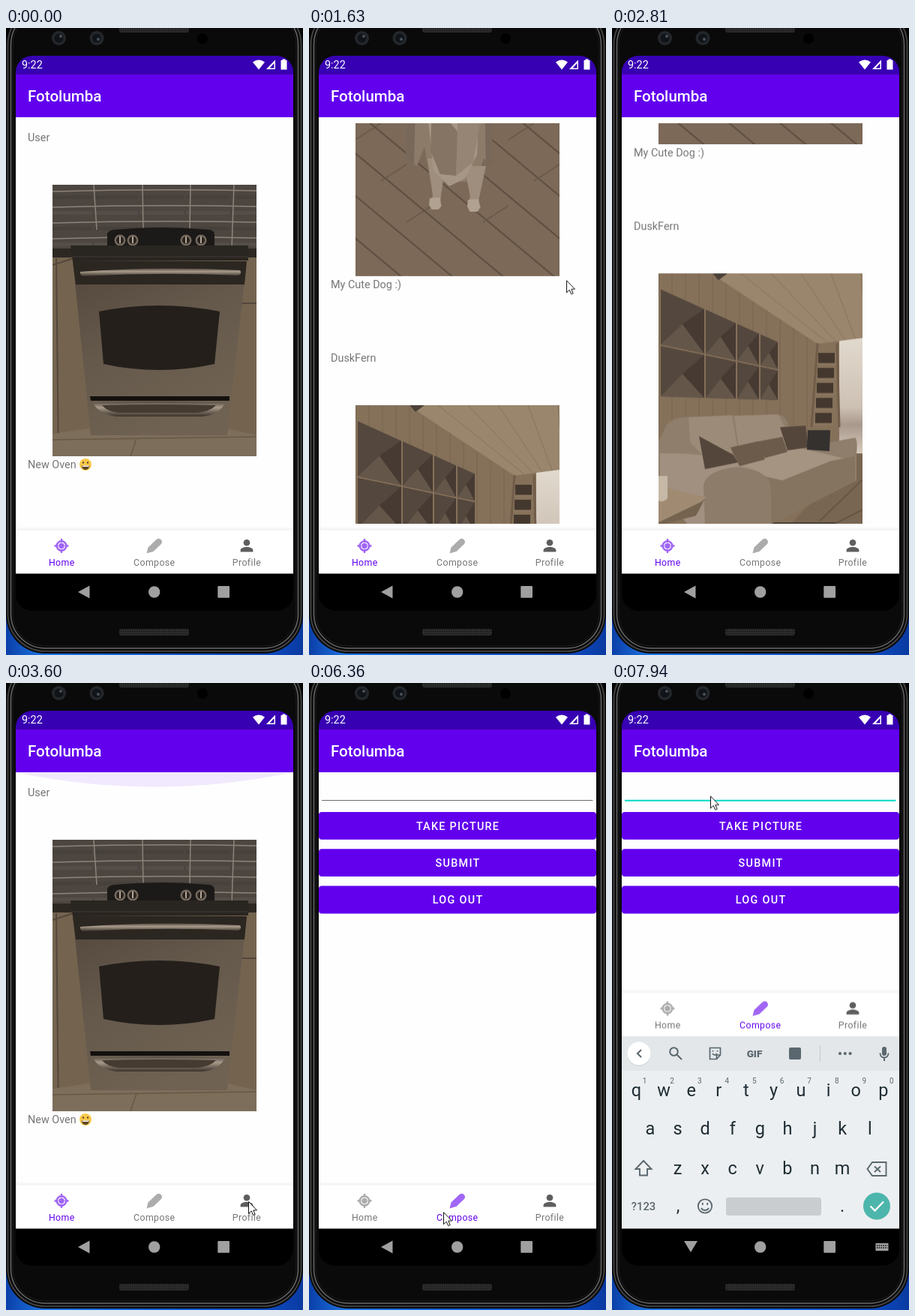
Recreate the animation shown at these times as an HTML page. Size 396 px wide and 836 px high, loop 8000 ms.

```html
<!DOCTYPE html>
<html lang="en">
<head>
<meta charset="utf-8">
<title>Photo feed</title>
<style>
html, body { margin: 0; width: 100%; height: 100%; overflow: hidden; background: #000; }
svg { display: block; }
text { font-family: Roboto, "Noto Sans", sans-serif; }
.title { font-size: 20.6px; font-weight: 500; fill: #fff; }
.body { font-size: 14.4px; fill: #757575; }
.mid { text-anchor: middle; }
.label { font-size: 12.3px; letter-spacing: .4px; fill: currentColor; }
.btn { font-size: 14.4px; font-weight: 500; letter-spacing: 1.28px; fill: #fff; }
.key { font-size: 23.5px; fill: #1f2d34; }
.hint { font-size: 10px; fill: #5a676e; }
.line { fill: none; stroke: #5a676e; stroke-width: 2; }
</style>
</head>
<body>
<svg id="stage" width="396" height="836" viewBox="0 0 396 836">
<defs>
  <clipPath id="screen"><rect x="13" y="37" width="370" height="740" rx="22"/></clipPath>
  <clipPath id="feedBox"><rect x="13" y="127" width="370" height="534"/></clipPath>
  <clipPath id="navBox"><rect x="13" y="670" width="370" height="58"/></clipPath>
  <clipPath id="keysBox"><rect x="13" y="400" width="370" height="328"/></clipPath>
  <linearGradient id="wall" x2="1"><stop stop-color="#0b3fa8"/><stop offset=".12" stop-color="#1c72e0"/><stop offset=".9" stop-color="#0c48bd"/><stop offset="1" stop-color="#0a3aa0"/></linearGradient>
  <linearGradient id="steel" x2=".5" y2="1"><stop stop-color="#53473d"/><stop offset=".5" stop-color="#65594c"/><stop offset="1" stop-color="#6f6252"/></linearGradient>
  <linearGradient id="silver" x2="0" y2="1"><stop stop-color="#51483f"/><stop offset=".4" stop-color="#a89b8b"/><stop offset="1" stop-color="#3a322b"/></linearGradient>
  <linearGradient id="wood" x2="1" y2="1"><stop stop-color="#8f7b65"/><stop offset="1" stop-color="#7b6750"/></linearGradient>
  <linearGradient id="sky" x2="0" y2="1"><stop stop-color="#e2d9ce"/><stop offset=".6" stop-color="#cdc1b4"/><stop offset=".75" stop-color="#a9998c"/><stop offset="1" stop-color="#d6cabd"/></linearGradient>
  <linearGradient id="rim" x2="0" y2="1"><stop stop-color="#000" stop-opacity="0"/><stop offset="1" stop-color="#000" stop-opacity=".06"/></linearGradient>
  <pattern id="check" width="16" height="18" patternUnits="userSpaceOnUse" patternTransform="matrix(1 -.2 0 1 151 121)">
    <path fill="#b7b4b2" d="M0 0H16V18H0Z"/><path fill="#17171a" d="M0 0H8V9H0ZM8 9H16V18H8Z"/>
  </pattern>
  <pattern id="mesh" width="3" height="3" patternUnits="userSpaceOnUse">
    <path fill="#2d2d2d" d="M0 0H3V3H0Z"/><path fill="#171717" d="M0 0H1.5V1.5H0Z"/>
  </pattern>
</defs>

<!-- phone body -->
<path fill="url(#wall)" d="M0 740H396V836H0Z"/>
<rect x="0" y="-30" width="396" height="864" rx="52" fill="#0b0b0b"/>
<rect x="2.5" y="-28" width="391" height="859" rx="50" fill="none" stroke="#4b4b4b" stroke-width="1.5"/>
<rect x="6.5" y="-24" width="383" height="851" rx="46" fill="#070707" stroke="#686868" stroke-width="1.5"/>
<rect x="9" y="-21" width="378" height="845" rx="43" fill="#0a0a0a" stroke="#1f1f1f"/>
<rect x="151" y="-4" width="93" height="10" rx="3" fill="url(#mesh)"/>
<rect x="151" y="801" width="93" height="9" rx="3" fill="url(#mesh)"/>
<g fill="#24272b"><circle cx="70.500" cy="13.500" r="9.500"/><circle cx="121" cy="13.500" r="9.500"/></g>
<g fill="#101419"><circle cx="70.500" cy="13.500" r="6"/><circle cx="121" cy="13.500" r="6"/></g>
<g fill="#47525c"><circle cx="73" cy="11" r="2"/><circle cx="123" cy="15" r="2"/></g>
<circle cx="262" cy="14" r="7" fill="#000"/>

<g clip-path="url(#screen)">
  <path fill="#fefefe" d="M13 119H383V728H13Z"/>

  <g id="home">
    <g clip-path="url(#feedBox)"><g id="feed"></g></g>
    <path id="glow" fill="#6200ee" d="M13 119H383Q198 158 13 119Z"/>
  </g>

  <g id="compose">
    <path fill="#fefefe" d="M13 119H383V670H13Z"/>
    <path id="rule" d="M17 156.500H378.500" stroke="#6d6d6d"/>
    <path id="ruleOn" d="M17 156.700H378.500" stroke="#03dac5" stroke-width="2"/>
    <path id="caret" d="M17.500 130V154" stroke="#03dac5" stroke-width="2"/>
    <g id="buttons"></g>
  </g>

  <g id="nav">
    <path fill="url(#rim)" d="M13 665H383V670H13Z"/>
    <path fill="#fff" d="M13 669.500H383V728H13Z"/>
    <g clip-path="url(#navBox)"><circle id="ripple" r="68" fill="#6200ee"/></g>
    <g id="tabHome">
      <g fill="none" stroke="currentColor" opacity=".6"><circle cx="74" cy="690.500" r="6.300" stroke-width="2.600"/><path stroke-width="2.400" d="M74 681V686M74 695V700M64.500 690.500H69.500M78.500 690.500H83.500"/><circle cx="74" cy="690.500" r="3.700" fill="currentColor" stroke="none"/></g>
      <text class="label mid" x="74.300" y="717">Home</text>
    </g>
    <g id="tabCompose">
      <path fill="currentColor" opacity=".6" d="M187.500 700.500L189.500 692.500 200 682.500Q203 679.500 206 681.500 209.500 684.500 207 688L196.500 698Z"/>
      <text class="label mid" x="197.800" y="717">Compose</text>
    </g>
    <g color="#757575">
      <g fill="#5e5e5e"><circle cx="321" cy="686.300" r="4.300"/><path d="M312.600 698.500V696.500C312.600 690.500 329.400 690.500 329.400 696.500V698.500Z"/></g>
      <text class="label mid" x="321" y="717">Profile</text>
    </g>
  </g>

  <g clip-path="url(#keysBox)"><g id="keys">
    <path fill="#eceff1" d="M13 471H383V728H13Z"/><path fill="#e3e7ea" d="M13 471H383V517H13Z"/>
    <circle cx="36" cy="495" r="15.500" fill="#c9ced2"/><circle cx="36" cy="494" r="15.500" fill="#fff"/>
    <g class="line">
      <path d="M39 489L34 494 39 499"/>
      <circle cx="82.500" cy="491.500" r="5.300"/><path d="M86.500 495.500L93 502"/>
      <path stroke-width="1.700" d="M132 486.500H144.500V496L139.500 501.500H130.500V486.500H133M139.500 501V496H144M134 494Q137 498 140 494M134.500 490V491.500M140.500 490V491.500"/>
      <path stroke-width="1" stroke="#c3c9cd" d="M277.500 483V505"/>
      <path d="M357.500 493.500C357.500 501.500 368.500 501.500 368.500 493.500M363 499.500V504"/>
      <path stroke-width="1.900" d="M42 637L31.500 648H37V656.500H47V648H52.500Z"/>
      <path stroke-width="1.900" d="M347 639H365.500V657H347L340.500 648ZM350 644.500L358 652M358 644.500L350 652"/>
      <circle cx="124" cy="697.500" r="9.200" stroke-width="1.800"/><path d="M119 700C121 704 127 704 129 700M120.800 693V696M127.200 693V696" stroke-width="1.800"/>
    </g>
    <g fill="#5a676e">
      <text class="mid" x="190" y="498.800" font-size="13.500" font-weight="900">GIF</text>
      <rect x="236" y="486" width="16" height="16" rx="2"/>
      <circle cx="304" cy="494" r="2.100"/><circle cx="310.800" cy="494" r="2.100"/><circle cx="317.600" cy="494" r="2.100"/>
      <rect x="360" y="485" width="6" height="12" rx="3"/>
      <text class="mid" x="42" y="703" font-size="14.800" font-weight="500">?123</text>
    </g>
    <rect x="152" y="686" width="127" height="24" rx="3" fill="#c9cdd0"/>
    <circle cx="353" cy="697.500" r="18" fill="#4db6ac"/>
    <path d="M344.500 697.500L350.500 703.500 362 691.500" fill="none" stroke="#fff" stroke-width="2.300"/>
  </g></g>

  <path fill="#3700b3" d="M13 37H383V61.500H13Z"/>
  <path fill="#6200ee" d="M13 61.500H383V119H13Z"/>
  <text x="21" y="54.300" font-size="14.400" fill="#fff">9:22</text>
  <g fill="#fff">
    <path d="M329 45.500Q337 39.500 345 45.500L337 55.500Z"/>
    <path d="M359 42.500V55H347Z"/><path fill="#3700b3" d="M357.500 47V53.500H351.500Z"/>
    <path d="M366.500 43H368.500V41.500H372.500V43H374.500V55.500H366.500Z"/>
  </g>
  <text class="title" x="29" y="98">Fotolumba</text>

  <path fill="#000" d="M13 727.500H383V777H13Z"/>
  <g fill="#a0a0a0">
    <path id="back" d="M96 752L111.500 743.500V760.500Z"/>
    <g id="hide"><path d="M96 744H114L105 759Z"/><path d="M351.500 747H368.500V757H351.500Z"/><path d="M353 750H367.500M353 753H367.500" stroke="#000" stroke-width="1.300" stroke-dasharray="1.500 1.300"/></g>
    <circle cx="197.700" cy="752" r="7.700"/><rect x="282.300" y="744" width="15.700" height="15.700" rx="1"/>
  </g>
</g>

<g id="mouse"><path fill="#fff" stroke="#111" d="M.5.5V16.500L4.200 13 6.700 18.500 9.200 17.500 6.800 12H11.500Z"/></g>
</svg>

<script>
const LOOP = 8000, POST = 534;
const $ = id => document.getElementById(id);
const add = (id, markup) => $(id).insertAdjacentHTML('beforeend', markup);
const range = (n, fn) => Array.from({ length: n }, (_, i) => fn(i)).join('');
const path = (fill, d) => `<path fill="${fill}" d="${d}"/>`;
const lines = (stroke, d, width = 1) => `<path fill="none" stroke="${stroke}" stroke-width="${width}" d="${d}"/>`;

const shelves = (x, y, w, n, gap, slope) => range(n, i =>
  path('#44382e', `M${x + i * slope} ${y + i * gap - 15}h${w}v14h${-w}z`) +
  lines('#8a7660', `M${x + i * slope - 3} ${y + i * gap}h${w + 6}`, 3));

function oven() {
  const tiles = range(4, r => lines('#8c8379', `M0 ${9 + r * 21}Q136 ${5 + r * 21} 272 ${8 + r * 21}`, 1.5) +
    range(5, c => path(r % 2 ? '#554e48' : '#47413c', `M${c * 61 - 5} ${14 + r * 21}h58v5h-58z`)));
  const knobs = [90, 107, 178, 198].map(x => `<circle cx="${x}" cy="74" r="7.500" fill="#75695e"/><circle cx="${x}" cy="74" r="5" fill="#292420"/>` +
    lines('#b5a797', `M${x} 69v9`, 2)).join('');
  return path('#4d4640', 'M0 0H272V100H0Z') + tiles + lines('#8c8379', 'M55 0L59 60M120 0L121 60M184 0L183 60M242 0L239 85', 1.5) +
    path('#74644f', 'M0 95H272V362H0Z') + lines('#54473a', 'M0 107L28 98M5 98L8 362M252 158H272', 2) +
    path('#2e2823', 'M0 85H272V97H0Z') + path('#7d6e5b', 'M0 332L48 325H233L272 334V362H0Z') +
    lines('#665845', 'M0 340L272 336M112 338L104 362', 1.5) +
    path('#1c1a18', 'M73 84V65Q75 61 82 60 145 54 210 60 216 62 216 66V84Z') + knobs +
    path('url(#steel)', 'M27 102H259L233 334H51Z') + path('#2c2621', 'M27 102H259L256 133H31Z') +
    path('#292521', 'M24 81H261V101L27 102Z') + lines('#403a34', 'M24 96H261') +
    path('url(#silver)', 'M37 116Q145 108 250 114Q253 118 248 121 145 116 41 122 36 120 37 116Z') +
    path('#241f1b', 'M62 169Q142 153 223 169L216 239Q142 255 68 239Z') +
    path('#14110f', 'M50 282H236V288H51Z') +
    path('url(#silver)', 'M54 291Q140 287 230 291 222 307 200 309H85Q62 306 54 291Z') +
    path('#463b31', 'M66 294Q142 292 218 294 211 302 193 304H90Q73 303 66 294Z');
}

function dog() {
  return path('#7c6958', 'M0 0H272V362H0Z') +
    range(9, i => lines('#5f4f42', `M${i * 68 - 310} 110L${i * 68 + 20} 385`, 2) +
      lines('#6b5a4b', `M${i * 34} ${180 + i % 3 * 55}l34 -22`, 1.5)) +
    path('#8d7b6a', 'M68 60H183L180 212 171 205 162 236 100 236 92 190 82 215 67 206Z') +
    path('#9f8e7d', 'M96 205H121L113 262 115 268 111 273H101L98 266 103 255Z') +
    path('#9f8e7d', 'M145 215H174L164 262 167 270 163 276H152L149 268 153 256Z') +
    path('#b1a190', 'M99 258L113 257 114 269 110 273H102L98 267ZM150 260L164 259 166 270 162 276H153L149 269Z') +
    path('#a69686', 'M87 60H168L162 200 146 232 125 242 104 222Z') +
    path('#857363', 'M102 130L137 170 134 228 113 226 100 195Z') +
    path('#968574', 'M137 130H171L157 210 134 228Z') + path('#78685a', 'M68 60H82L78 213 67 206ZM171 60H185L182 210 174 218Z');
}

function sofa() {
  const xs = [3, 63, 105, 136, 161];
  const edge = (x, row) => [20 + x * .45, 96 + x * .21, 166 + x * .03][row];
  const panels = range(8, i => {
    const c = i % 4, r = i >> 2, a = xs[c], b = xs[c + 1] - 2;
    const [p, q, s, t] = [edge(a, r), edge(b, r), edge(b, r + 1) - 2, edge(a, r + 1) - 2];
    const mx = (a + b) / 2, my = (p + q + s + t) / 4;
    return path('#54473d', `M${a} ${p}L${b} ${q}V${s}L${a} ${t}Z`) + path('#65564a', `M${a} ${t}L${mx} ${my}L${b} ${s}Z`) +
      path('#463a32', `M${b} ${q}V${s}L${mx} ${my}Z`);
  });
  return path('#85715a', 'M0 0H272V362H0Z') + range(12, i => lines('#78654f', `M${i * 18} 0V215`)) +
    path('#9a866c', 'M70 0H272V86L212 94Z') + range(5, i => lines('#88745d', `M${110 + i * 40} 0L${225 + i * 13} 92`)) +
    path('#4b4138', 'M72 0H92L80 9Z') + panels +
    path('url(#sky)', 'M241 90L272 86V240H241Z') + shelves(213, 121, 22, 5, 20, -1) +
    lines('#715d49', 'M212 93L204 205M238 93L241 205', 3) +
    path('#796652', 'M150 362L264 240H272V362Z') + lines('#5f5041', 'M215 330L272 275M180 362L272 315', 1.5) +
    path('#43382f', 'M60 362L140 332H238L180 362Z') +
    path('#8f7e6c', 'M9 205Q15 192 40 191L160 188Q172 190 175 210L230 225 262 219Q266 222 264 240V276L150 334H60L0 310V225Z') +
    path('#9c8b79', 'M40 192L98 189 106 238 60 244 42 225ZM101 190L160 188 172 212 170 230 108 238Z') +
    path('#a59481', 'M60 250L172 229 262 250 170 283Z') + path('#85745f', 'M80 256L165 276 230 250 262 244V276L150 334V290Z') +
    path('#a19080', 'M2 240Q70 238 120 258 150 268 149 288V336H40L2 290Z') + path('#8d7c6a', 'M60 282Q64 262 105 258 148 262 149 286V336H62Z') +
    path('#55463b', 'M54 217L100 242 106 252 62 261ZM162 205L196 203 200 232 172 236Z') +
    path('#6c5a4b', 'M96 232L132 224 142 248 108 257ZM128 225L165 218 172 238 142 246Z') + path('#34312f', 'M199 209L229 209 228 237 198 235Z') +
    path('#75634f', 'M0 288L62 300 50 323 0 336Z') + path('#a08b72', 'M0 284L64 298 58 304 0 332Z') +
    path('#c5b8a6', 'M0 270H12V300Q6 306 0 303Z');
}

function room() {
  return path('url(#wood)', 'M0 0H272V362H0Z') + path('#97846c', 'M0 0H215L112 72 0 58Z') +
    range(5, i => lines('#86735c', `M${i * 45} 0L${45 + i * 17} 64`)) + range(9, i => lines('#776349', `M${122 + i * 19} ${64 - i * 7}V195`)) +
    path('url(#sky)', 'M0 62L63 68V205L0 212Z') + lines('#6a5848', 'M0 61L64 68V215', 2) +
    path('#9d8b77', 'M0 212L130 205 272 300V362H0Z') + lines('#816e5b', 'M0 225L130 213M20 210L8 250M45 208L40 245M115 230L225 331', 1.5) +
    shelves(75, 100, 28, 6, 22, 1) + lines('#5d4b3c', 'M65 69L76 221M99 73L117 219', 4) +
    path('#5c4f43', 'M0 251L108 239 208 331 160 362H0Z') + range(4, i => lines('#4c4036', `M0 ${268 + i * 25}L${118 + i * 24} ${249 + i * 24}`, 4)) +
    path('#8c765e', 'M128 199L150 190 272 208V262L232 271 128 231Z') + path('#a48d72', 'M128 199L150 190 272 202V212L225 218Z') +
    lines('#66533f', 'M180 208V249M225 218V270M135 234L139 251M223 270L229 297M262 264L257 291', 2) +
    path('#29241f', 'M170 198L200 193 236 198 205 202ZM180 185H194V197H180Z') +
    path('#28211c', 'M148 117L245 96 242 194 149 183Z') + path('url(#check)', 'M151 120L242 100 239 190 151 180Z') +
    path('#00a000', 'M149 166L160 165 161 183 149 181Z') +
    path('#b9ab9a', 'M57 207L61 203 66 208 70 205 71 215 75 222 76 238H58L57 224 60 217Z');
}

const smiley = `<circle cx="106" cy="582" r="8" fill="#fbc94b"/>` + path('#5b4524', 'M100.500 583.500H111.500Q110 589 106 589 102 589 100.500 583.500Z') +
  path('#fff', 'M101.500 583.500H110.500V585H102Z') + `<g fill="#5b4524"><circle cx="103" cy="579.500" r="1.200"/><circle cx="109" cy="579.500" r="1.200"/></g>`;

const posts = [
  ['User', 'New Oven', oven], ['User', 'My Cute Dog :)', dog],
  ['DuskFern', 'Post', sofa], ['DuskFern', 'Post', room]
];
posts.forEach(([author, note, photo], i) => add('feed', `<g transform="translate(0 ${i * POST})">
  <text class="body" x="29" y="151">${author}</text>
  <svg x="62" y="209" width="272" height="362">${photo()}</svg>
  <text class="body" x="29" y="587">${note}</text>${i ? '' : smiley}</g>`));

['TAKE PICTURE', 'SUBMIT', 'LOG OUT'].forEach((name, i) => {
  const y = 172 + i * 49.3;
  add('buttons', `<rect x="13" y="${y}" width="370" height="36.800" rx="4" fill="#6200ee"/><text class="btn mid" x="198.600" y="${y + 23.6}">${name}</text>`);
});

[['qwertyuiop', 32.5, 551], ['asdfghjkl', 51, 602], ['zxcvbnm', 87.5, 655]].forEach(([row, x, y], r) =>
  [...row].forEach((ch, i) => {
    const cx = x + i * 36.6;
    add('keys', `<text class="key mid" x="${cx}" y="${y}">${ch}</text>`);
    if (!r) add('keys', `<text class="hint mid" x="${cx + 11}" y="534">${(i + 1) % 10}</text>`);
  }));
add('keys', '<text class="key mid" x="88" y="705">,</text><text class="key mid" x="307" y="705">.</text>');

// rows are [ms, value]; the last value holds to the end of the loop
function play(id, prop, rows, easing = 'linear') {
  const all = [...rows, [LOOP, rows[rows.length - 1][1]]];
  $(id).animate(all.map(([t, v]) => ({ offset: t / LOOP, [prop]: v, easing })), { duration: LOOP, iterations: Infinity });
}
const move = (id, rows) => play(id, 'transform', rows.map(([t, x, y]) => [t, `translate(${x}px,${y}px)`]));
const set = (id, prop, ...rows) => play(id, prop, rows, 'step-end');

move('feed', [[0, 0], [1150, 0], [1250, 90], [1400, 330], [1630, 773], [1750, 905], [1870, 985], [1960, 1035],
  [2060, 1220], [2180, 1481], [2260, 1575], [2340, 1602], [2440, 1602], [2560, 1500], [2680, 1270], [2810, 952],
  [2960, 620], [3120, 310], [3280, 95], [3400, 0]].map(([t, y]) => [t, 0, -y]));

move('mouse', [[0, 243, 750], [200, 243, 750], [450, 270, 670], [750, 303, 585], [1000, 309, 567], [1150, 318, 655],
  [1300, 332, 480], [1450, 341, 360], [1630, 343, 336], [1920, 344, 420], [2060, 362, 270], [2180, 372, 172],
  [2400, 372, 180], [2560, 368, 340], [2720, 362, 600], [2880, 358, 640], [3120, 346, 755], [3600, 323, 691],
  [3760, 323, 690], [4100, 240, 640], [4300, 177, 650], [4460, 225, 676], [4620, 187, 583], [4780, 187, 583],
  [5020, 180, 680], [5180, 179, 706], [5350, 177, 724], [5570, 179, 706], [6360, 179, 706], [6600, 172, 520],
  [6900, 145, 220], [7150, 136, 153], [7300, 136, 153], [7480, 131, 150.5]]);
set('mouse', 'opacity', [0, 0], [200, 1], [2730, 0], [2880, 1]);

play('glow', 'opacity', [[0, 0], [3380, 0], [3480, .12], [3900, 0]]);

set('tabHome', 'color', [0, '#6200ee'], [5730, '#757575']);
set('tabCompose', 'color', [0, '#757575'], [5730, '#6200ee']);
play('ripple', 'transform', [[0, .2], [5690, .2], [5930, 1]].map(([t, k]) => [t, `translate(198px,699px) scale(${k})`]));
play('ripple', 'opacity', [[0, 0], [5690, 0], [5730, .12], [5950, .12], [6130, 0]]);

set('home', 'opacity', [0, 1], [6360, 0]);
set('compose', 'opacity', [0, 0], [6360, 1]);
set('rule', 'opacity', [0, 1], [7320, 0]);
set('ruleOn', 'opacity', [0, 0], [7320, 1]);
set('caret', 'opacity', [0, 0], [7400, 1], [7940, 0]);
set('back', 'opacity', [0, 1], [7400, 0]);
set('hide', 'opacity', [0, 0], [7400, 1]);
set('nav', 'transform', [0, 'translateY(0px)'], [7560, 'translateY(-256.500px)']);
move('keys', [[0, 0, 257], [7400, 0, 257], [7500, 0, 130], [7600, 0, 45], [7770, 0, 0]]);
</script>
</body>
</html>
```
